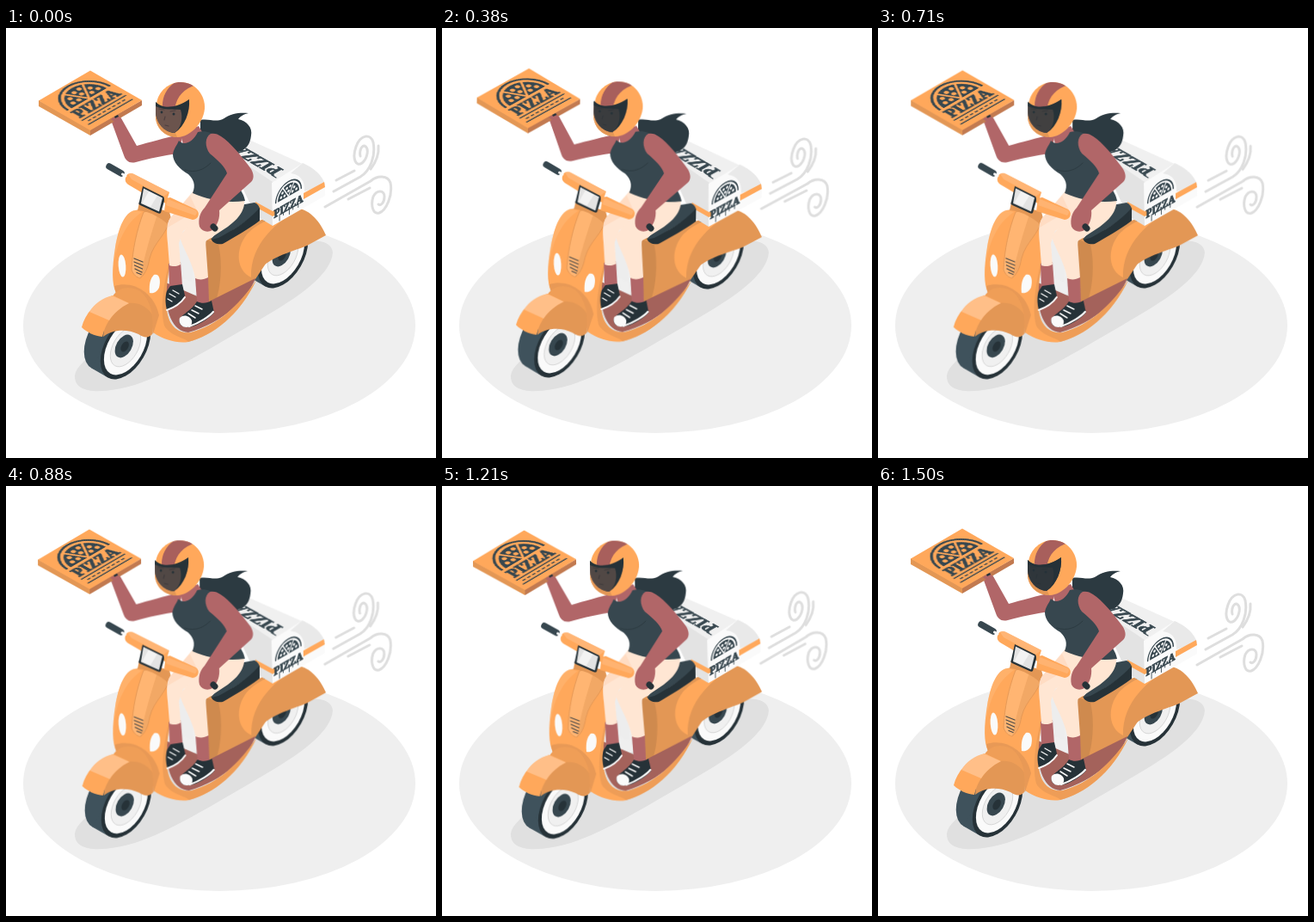
These frames come from a looping animation (500x500 px, 1.54 s). An HTML page:

```html
<!DOCTYPE html>
<html lang="en">
<head>
<meta charset="utf-8">
<title>Pizza delivery</title>
<style>
  html, body { margin: 0; width: 100%; height: 100%; overflow: hidden; background: #fff; }
  svg { display: block; width: 100vw; height: 100vh; }
  .or { fill: #ffa85b; } .od { fill: #e39755; } .ol { fill: #ffbf88; }
  .sk { fill: #b16668; } .br { fill: #a4625b; } .cr { fill: #ffe6d3; }
  .dk { fill: #37474f; } .bk { fill: #263238; } .tr { fill: #3f525c; }
  .wh { fill: #fafafa; } .gr { fill: #e3e3e3; }
  .ln { fill: none; stroke-linecap: round; stroke-linejoin: round; }
  .word { font: 900 18px "Noto Serif", serif; fill: #37474f; stroke: #37474f; stroke-width: .9; }
  #rock { transform-origin: 245px 235px; }
</style>
</head>
<body>
<svg viewBox="0 0 500 500">
  <defs>
    <g id="wheel" transform="rotate(30)">
      <ellipse class="tr" cx="-22" rx="24" ry="41"/>
      <rect class="tr" x="-22" y="-41" width="22" height="82"/>
      <ellipse class="bk" rx="24" ry="41"/>
      <ellipse class="wh" rx="20.5" ry="35.5"/>
      <ellipse rx="14.5" ry="25" fill="#f0f0f0" stroke="#d2d2d2" stroke-width=".8"/>
      <ellipse class="dk" cx="-2" rx="9" ry="14.5"/>
      <ellipse class="bk" cx="-1" rx="4" ry="6.5"/>
    </g>
    <g id="pie">
      <path class="ln" d="M-28-4A28 28 0 0 1 28-4" stroke="#37474f" stroke-width="2.6" style="stroke-linecap:butt"/>
      <path class="dk" d="M-23.5-4A23.5 23.5 0 0 1 23.5-4Z"/>
      <g id="bits" style="fill:var(--bg);stroke:var(--bg)"></g>
    </g>
    <clipPath id="glass"><path d="M174 86C182 95 199 93 213 83C214 98 208 114 196 122C184 121 175 111 174 98Z"/></clipPath>
    <clipPath id="shell"><path d="M175 88C177 73 190 63 203 63C220 63 232 78 231 94C229 112 214 126 200 127C186 127 175 118 174 104Z"/></clipPath>
  </defs>

  <ellipse cx="248" cy="346" rx="228" ry="125" fill="#efefef"/>
  <path d="M80 405C81 390 105 376 150 345L335 252C355 244 379 246 380 261C378 290 330 319 285 345C240 371 190 402 150 415C115 425 80 427 80 405Z" fill="#e0e0e0"/>

  <g id="rock">
    <!-- wind -->
    <g class="ln" stroke="#dedede" stroke-width="3">
      <path d="M381 190L412 173C424 166 430 148 427 133C424 122 412 124 407 138C402 152 407 162 414 157C420 152 423 140 417 137C412 137 411 145 412 149"/>
      <path d="M433 137C434 147 430 156 424 164M384 177L405 166M398 199L423 186"/>
      <path d="M371 208L424 178C432 171 444 171 447 180C450 195 442 212 434 215C426 217 424 205 427 196C431 188 440 188 440 196C440 203 436 207 433 205"/>
    </g>

    <use href="#wheel" transform="translate(322 265)"/>

    <!-- rear body -->
    <path class="od" d="M233 246L300 222L310 262L290 292C272 306 254 315 235 321C230 300 229 270 233 246Z"/>
    <path d="M247 252C252 272 250 300 244 317L235 321C230 300 229 270 233 246Z" fill="#cf8a4e"/>
    <path class="od" d="M285 290C283 262 300 232 340 210C353 211 366 226 372 241L350 253C331 261 304 266 285 290Z"/>
    <path class="or" d="M285 290C268 282 266 258 280 240C290 229 310 218 345 208C315 225 284 250 285 290Z"/>

    <!-- cargo box -->
    <path d="M255 150L285 131L345 158L311 181Z" fill="#f0f0f0"/>
    <path class="gr" d="M255 142L310 179V230L290 218Z"/>
    <path class="wh" d="M309 180L345 157C359 163 368 172 371 182V195L310 230Z"/>
    <path d="M345 157C359 163 368 172 371 182L347 190C348 178 342 170 331 169Z" fill="#e9e9e9"/>
    <path class="or" d="M290 202L310 213V219L290 208ZM310 213L314 211V217L310 219ZM346 192L370 179L371 185L346 199Z"/>
    <g transform="matrix(-.87 -.5 .87 -.5 323 165)"><text class="word" style="font-size:19px">PIZZA</text></g>
    <path class="ln" d="M309 171l5 3M291 148l6 3M304 155l4 2" stroke="#37474f" stroke-width="1.2"/>
    <g transform="matrix(.87 -.5 0 1 328.5 198)" style="--bg:#fafafa">
      <use href="#pie" transform="scale(.61 .61)"/>
      <text class="word" y="13.500" text-anchor="middle" style="font-size:12.5px">PIZZA</text>
      <path class="ln" d="M-12 13v7M-7 13v3M1 13v6M6 13v3M13 13v4" stroke="#37474f" stroke-width="1"/>
    </g>

    <!-- seat -->
    <path class="dk" d="M238 246L272 206L289 203C296 206 297 214 292 216C280 225 262 236 247 246Z"/>
    <path class="bk" d="M239 246L247 244C262 236 280 226 295 209V224C282 234 266 243 252 251C246 252 240 250 239 246Z"/>

    <use href="#wheel" transform="translate(139 371)"/>

    <!-- floor and leg shield -->
    <path class="br" d="M186 296L236 318L290 291C282 314 252 343 212 354C194 353 184 330 186 296Z"/>
    <path d="M200 232L217 240V296L203 290Z" fill="#ededed"/>
    <path class="or" d="M150 212C138 214 131 232 127 255C123 280 123 298 128 308C150 314 168 330 171 354C184 363 200 367 212 365C240 358 272 334 291 293C270 324 245 346 215 354C200 356 189 346 187 328C184 300 192 270 196 245C197 235 190 222 182 216C172 210 160 210 150 212Z"/>
    <path class="od" d="M196 245C192 270 184 300 187 328C189 346 200 356 215 354C245 346 270 324 291 293C272 334 240 358 212 365C210 361 190 358 184 346C178 320 185 290 196 245Z" opacity=".6"/>
    <path class="ol" d="M150 212C138 214 131 232 127 255L124 285C128 250 138 228 158 214Z" opacity=".35"/>
    <path class="od" d="M126 300C146 293 172 306 178 334L171 356L128 310Z" opacity=".8"/>
    <path d="M160 214C152 235 147 258 146 281C148 287 152 290 156 291C163 285 165 278 167 268C172 248 188 240 190 222C181 213 170 211 160 214Z" fill="#ffb572" stroke="#e39755" stroke-width=".9"/>
    <path class="od" d="M177 214C170 235 162 260 156 291C163 285 165 278 167 268C172 248 188 240 190 222C187 218 183 215 177 214Z" opacity=".45"/>
    <path class="ln" d="M149 268l10 4M149 272l10 4M149.500 276l9 4M150 280l8 4M152 284.500l5 2" stroke="#4a4a48" stroke-width="1.3"/>
    <ellipse class="wh" cx="135" cy="276.500" rx="4.300" ry="13" transform="rotate(-4 135 276.500)"/>
    <path class="wh" d="M172 287C179 285 180 294 178 302C175 308 170 309 167 308C166 298 168 291 172 287Z"/>

    <!-- front fender -->
    <path class="od" d="M124 312C132 300 145 300 156 306C168 315 172 334 170 356C166 361 160 360 154 356C140 349 122 351 113 359C115 338 120 324 124 312Z"/>
    <path class="or" d="M88 348C92 332 104 318 124 311L143 320C126 328 116 342 112 359C103 358 94 354 88 348Z"/>
    <path class="ol" d="M97 330C103 320 112 314 124 311L143 320C133 325 125 332 120 340Z"/>
    <path class="or" d="M124 312C132 300 145 300 156 306C164 312 168 322 170 333C162 322 152 319 143 320Z" opacity=".4"/>

    <!-- steering -->
    <path class="od" d="M155 203L190 214L196 236C184 222 168 213 153 212Z"/>
    <path class="or" d="M139 174C140 169 145 168 149 170L190 191L186 204L159 192L142 182C139 180 138 177 139 174Z"/>
    <path class="ol" d="M142 170C145 168 147 169 149 170L190 191L183 196L146 176Z" opacity=".6"/>
    <path class="ln" d="M120 161L134 169" stroke="#37474f" stroke-width="7.500"/>
    <path class="ln" d="M135.500 170L139 172" stroke="#fafafa" stroke-width="3"/>

    <!-- far leg -->
    <path class="sk" d="M189 274L203 272L205 300C200 306 194 306 190 302Z"/>
    <path class="bk" d="M187 306L191 300L205 298L208 311C205 318 195 325 187 328C185 320 185 312 187 306Z"/>
    <path class="ln" d="M190 309l7 4M194 305l7 4M188 315l5 3" stroke="#fafafa" stroke-width="1.300"/>
    <path class="ln" d="M187 328C196 325 204 319 208 313" stroke="#fafafa" stroke-width="2"/>
    <path class="cr" d="M219 188L191 221C186 228 187 240 188 250L190 276C194 278 200 277 203 275L201 250L206 236L230 222Z"/>
    <path d="M214 195L191 221C189 224 188 228 188 232L222 212Z" fill="#ffdcc3"/>

    <!-- near leg -->
    <path class="sk" d="M220 290L235 288L236 318C231 322 225 321 222 318Z"/>
    <path class="bk" d="M222 318C228 321 234 320 239 317L242 331C236 338 222 347 212 348C204 348 200 344 202 338C206 332 216 328 222 318Z"/>
    <path class="wh" d="M202 337C207 332 214 335 216 340C217 345 214 348 210 348C204 348 200 343 202 337Z"/>
    <path class="ln" d="M212 332l8 5M216 328l8 4M220 323l8 4" stroke="#fafafa" stroke-width="1.500"/>
    <path class="ln" d="M213 347C225 343 237 335 241 330" stroke="#fafafa" stroke-width="2.200"/>
    <path class="cr" d="M219 189L277 197C279 212 270 222 258 231L232 248L235 290C230 293 224 293 220 291C217 273 206 256 203 246C202 238 212 230 226 221Z"/>
    <path class="or" d="M186 198L191 197L221 211C226 214 224 223 217 223L184 213Z"/>
    <path class="ol" d="M188 199L221 212C223 214 222 216 220 218L186 206Z" opacity=".5"/>
    <path class="bk" d="M159 184L183 196C184 197 184 199 184 201L180 215C179 216 178 216 176 215L156 206C154 205 154 204 155 202Z"/>
    <path class="gr" d="M160 186.500L182 197.500L178 213.500L157 204Z"/>
    <path class="wh" d="M166 190L176 195L168 208L158.500 203.500Z" opacity=".7"/>

    <!-- raised arm -->
    <path class="sk" d="M122 107C125 102 132 101 134 105L152 137C166 133 184 128 206 123L201 146C184 148 166 152 151 156C143 158 139 154 137 148Z"/>

    <!-- hair, torso -->
    <path d="M226 107C236 105 243 110 252 106C262 99 272 98 282 99C277 100 272 103 270 106C280 108 287 116 285 125C284 135 279 142 270 144C262 146 250 142 243 134L226 124Z" fill="#2c3a41"/>
    <path class="sk" d="M203 122L224 114L231 126L206 136Z"/>
    <path class="dk" d="M201 131C207 138 218 132 223 121C230 119 240 121 246 127L258 160C264 180 276 188 278 201C256 204 236 200 217 192C221 182 218 176 212 170C202 164 194 156 194 147C195 140 199 136 201 131Z"/>
    <path class="ln" d="M208 165C220 169 230 165 238 157" stroke="#263238" stroke-width="1" opacity=".6"/>

    <!-- near arm -->
    <path class="sk" d="M238 123C231 127 231 138 237 146C248 155 255 162 257 169L231 209C226 214 223 222 225 231C228 237 235 238 240 235C246 229 249 221 248 212L285 179C289 175 288 169 285 164C274 149 261 133 250 126C246 123 242 122 238 123Z"/>
    <path class="ln" d="M241 231L243 233" stroke="#263238" stroke-width="7"/>

    <!-- helmet -->
    <g clip-path="url(#shell)">
      <rect class="or" x="170" y="60" width="66" height="70"/>
      <path d="M182 94C181 80 187 68 200 61L222 66C207 70 199 79 196 94Z" fill="#a85f5c"/>
      <path class="od" d="M174 96C175 112 184 121 197 122L200 129L170 120Z"/>
    </g>
    <g clip-path="url(#glass)">
      <rect class="bk" x="170" y="80" width="46" height="46"/>
      <path d="M174 91C184 96 194 94 203 95C206 104 204 116 196 122L174 118Z" fill="#a3705f"/>
      <path class="ln" d="M178 94l6 1M191 97l6-1M185 103l-1 4M185 113l4 1" stroke="#6d4a44" stroke-width="1.200"/>
      <circle class="bk" cx="181" cy="98" r="1.400"/><circle class="bk" cx="195" cy="100" r="1.500"/>
      <rect id="tint" class="bk" x="170" y="80" width="46" height="46"/>
    </g>

    <!-- carried pizza -->
    <path class="od" d="M38 84L98 118V125L38 91Z"/>
    <path d="M158 84L98 118V125L158 90Z" fill="#c27a50"/>
    <path class="or" d="M98 49.500L158 84L98 119L38 84.500Z"/>
    <path class="sk" d="M122 106L130 101.500L134 106L126 109Z"/>
    <path class="bk" d="M126 103L130 101L131 103L127 105Z"/>
    <g transform="matrix(.87 -.5 .87 .5 98 84)" style="--bg:#ffa85b">
      <use href="#pie" transform="translate(1.5 1)"/>
      <text class="word" y="14" text-anchor="middle">PIZZA</text>
      <g class="ln" stroke="#37474f" stroke-width="1.500">
        <path d="M-29 18H29M-29 27H29"/>
        <path d="M-25 22.500H26" stroke-dasharray="3 3.500"/>
      </g>
    </g>
  </g>
</svg>
<script>
  const LOOP = 1540;
  const $ = id => document.getElementById(id);

  // slice gaps and toppings of the half pizza
  const polar = (deg, r) => {
    const a = deg * Math.PI / 180;
    return [r * Math.cos(a), -4 - r * Math.sin(a)].map(v => v.toFixed(1));
  };
  const gaps = [60, 120].map(deg => `<path d="M0-4L${polar(deg, 25)}" stroke-width="2.4"/>`);
  const dots = [30, 90, 150].flatMap(mid =>
    [[-13, 18], [12, 17], [0, 10]].map(([da, r]) => {
      const [x, y] = polar(mid + da, r);
      return `<circle cx="${x}" cy="${y}" r="2.5" stroke="none"/>`;
    }));
  $("bits").innerHTML = gaps.concat(dots).join("");

  // steps: [ms, value]
  const play = (id, steps, pose) => $(id).animate(
    steps.map(([ms, v]) => ({ offset: ms / LOOP, ...pose(v) })),
    { duration: LOOP, iterations: Infinity, easing: "linear" });

  play("rock", [[0, 0], [375, 1], [1125, -1], [1500, 0], [LOOP, 0]],
    v => ({ transform: `rotate(${v}deg)` }));
  play("tint", [[0, .45], [210, .72], [500, .93], [880, .66], [1330, .66], [1500, .93], [LOOP, .93]],
    v => ({ opacity: v }));
</script>
</body>
</html>
```
